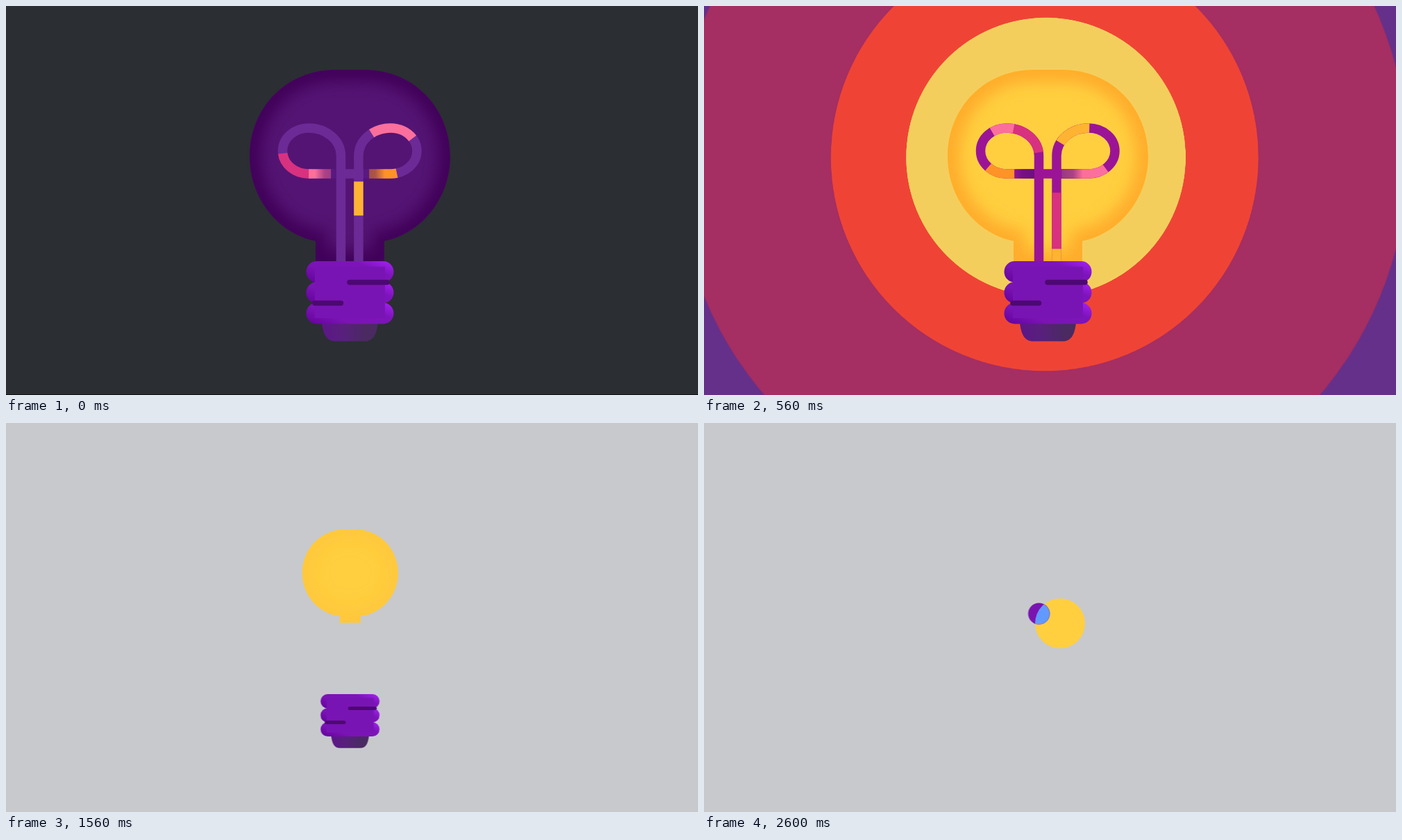
An HTML page without scripts that plays this animation: 997 by 561 pixels, repeating every 2640 ms.

```html
<!DOCTYPE html>
<html lang="en">
<head>
<meta charset="utf-8">
<title>Light bulb</title>
<style>
  html, body { margin: 0; width: 100%; height: 100%; overflow: hidden; background: #111; }
  svg { display: block; width: 100%; height: 100%; }
  svg * { animation: 2640ms linear infinite; }

  /* Expanding rings: one growth curve, 80 ms apart */
  .ring { animation-name: grow; animation-delay: calc(var(--lead) * -80ms); }
  .last { animation-name: grow, pale; animation-delay: 0s; }
  @keyframes grow {
    0%, 16.67% { transform: scale(0); }
    18.18% { transform: scale(1.25); }
    21.21% { transform: scale(2); }
    24.24% { transform: scale(3.05); }
    27.27% { transform: scale(5.22); }
    30.3%, 100% { transform: scale(8.5); }
  }
  @keyframes pale {
    0%, 19.7% { fill: #ffcf40; }
    27.27%, 100% { fill: #c8c9cd; }
  }

  /* Glass lights up, later shrinks to a ball */
  .glass { animation-name: shrink; }
  .fill { animation-name: shrink, light; }
  .edge { animation-name: shrink, light-edge; fill: none; stroke-width: 34; }
  .tube { animation-name: light-tube; }
  @keyframes shrink {
    0%, 46.97% {
      d: path("M446 370 L446 339 C392 328 351 277 351 217 C351 147 404 92 474 92 L517 92 C587 92 640 147 640 217 C640 277 599 328 545 339 L545 370 Z");
      animation-timing-function: ease-in;
    }
    62.12%, 100% {
      d: path("M496 252 L496 252 C476 252 460 236 460 216 C460 196 476 180 496 180 L496 180 C516 180 532 196 532 216 C532 236 516 252 496 252 L496 252 Z");
    }
  }
  @keyframes light {
    0%, 4.5% { fill: #541473; }
    10.6%, 100% { fill: #ffcf40; }
  }
  @keyframes light-edge {
    0%, 4.5% { stroke: #3f0058; }
    10.6%, 53% { stroke: #ffab2c; stroke-opacity: 1; }
    60.6%, 100% { stroke: #ffab2c; stroke-opacity: 0; }
  }
  @keyframes light-tube {
    0%, 4.5% { stroke: #6b2a95; }
    10.6%, 100% { stroke: #9b1496; }
  }

  /* Coloured pieces sliding along the filament */
  .run { animation-name: slide; }
  @keyframes slide {
    0% { stroke-dashoffset: calc(var(--a) * -1px); }
    15.15% { stroke-dashoffset: calc(var(--b) * -1px); }
    21.21% { stroke-dashoffset: calc(var(--c) * -1px); }
    28.79% { stroke-dashoffset: calc(var(--d) * -1px); }
    48.48% { stroke-dashoffset: calc(var(--e) * -1px); }
    58%, 100% { stroke-dashoffset: calc(40px - var(--e) * 1px); }
  }
  .filament { animation-name: fold; transform-origin: 496px 250px; }
  @keyframes fold {
    0%, 49.2% { transform: none; animation-timing-function: ease-in; }
    58%, 100% { transform: scale(0); }
  }

  .base { animation-name: drop; transform-origin: 496px 425px; }
  @keyframes drop {
    0%, 48.48% { transform: none; animation-timing-function: ease-in-out; }
    54.55% { transform: translateY(27px); animation-timing-function: ease-in; }
    62.12%, 100% { transform: translateY(-25px) scale(.25); }
  }

  .bulb { animation: hide 2640ms step-end infinite; }
  .balls { animation: show 2640ms step-end infinite; }
  @keyframes hide { 0% { opacity: 1; } 62.12%, 100% { opacity: 0; } }
  @keyframes show { 0% { opacity: 0; } 62.12%, 100% { opacity: 1; } }

  .sun { animation-name: sun; }
  .dot { animation-name: dot; }
  @keyframes sun {
    0%, 62.12% { transform: translate(496px, 216px); }
    63.64% { transform: translate(500px, 250px); animation-timing-function: ease-out; }
    71.21% { transform: translate(619px, 343px); animation-timing-function: ease-out; }
    80.3% { transform: translate(662px, 402px); animation-timing-function: ease-in-out; }
    84.85% { transform: translate(657px, 393px); animation-timing-function: ease-in; }
    98.48%, 100% { transform: translate(513px, 289px); }
  }
  @keyframes dot {
    0%, 62.12% { transform: translate(496px, 400px); }
    63.64% { transform: translate(485px, 340px); animation-timing-function: ease-out; }
    71.21% { transform: translate(327.5px, 216.5px); }
    72.73% { transform: translate(316px, 213px); animation-timing-function: ease-out; }
    84.85% { transform: translate(284px, 240px); animation-timing-function: ease-in; }
    98.48%, 100% { transform: translate(482.5px, 275px); }
  }
</style>
</head>
<body>
<svg viewBox="0 0 997 561" preserveAspectRatio="none">
  <defs>
    <clipPath id="glass-area"><path class="glass"/></clipPath>
    <clipPath id="sun-area"><circle class="sun" r="36"/></clipPath>
    <filter id="soft" x="-20%" y="-20%" width="140%" height="140%"><feGaussianBlur stdDeviation="11"/></filter>
    <linearGradient id="metal" x1="0" y1=".8" x2="1" y2=".2">
      <stop stop-color="#6805a0"/><stop offset=".3" stop-color="#7a14b4"/>
      <stop offset=".75" stop-color="#7d14ba"/><stop offset="1" stop-color="#9c1ee8"/>
    </linearGradient>
    <linearGradient id="foot">
      <stop stop-color="#5d1688"/><stop offset=".4" stop-color="#58207c"/><stop offset=".8" stop-color="#4a2a60"/>
    </linearGradient>
    <linearGradient id="shade">
      <stop stop-color="#4a0a6e" stop-opacity="0"/><stop offset=".45" stop-color="#4a0a6e" stop-opacity=".45"/>
      <stop offset="1" stop-color="#4a0a6e" stop-opacity=".55"/>
    </linearGradient>
    <path id="wire" d="M482.500 368V216A46.500 40 0 0 0 436 176A37.500 33 0 0 0 398.500 209A37.500 33 0 0 0 436 242H554A38 33 0 0 0 592 209A38 33 0 0 0 554 176A46 40 0 0 0 508 216V368"/>
    <rect id="thread" x="432.500" width="126" height="30.500" rx="15"/>
  </defs>

  <rect width="997" height="560" fill="#2b2e32"/>

  <g transform="translate(496 217.500)">
    <circle class="ring" style="--lead:3" cx="-1.700" cy=".3" r="100" fill="#65308a"/>
    <circle class="ring" style="--lead:2" cx="-1.700" cy=".3" r="100" fill="#a52e62"/>
    <circle class="ring" style="--lead:1" cx="-1.700" cy=".3" r="100" fill="#ef4435"/>
    <circle class="ring last" cx="-1.700" cy=".3" r="100"/>
  </g>

  <g class="bulb">
    <path class="glass fill"/>
    <g clip-path="url(#glass-area)">
      <path class="glass edge" filter="url(#soft)"/>
      <g class="filament" fill="none" stroke-width="13.500">
        <use href="#wire" class="tube"/>
        <use href="#wire" class="run" stroke="#d8317f" stroke-dasharray="56 2000" style="--a:279;--b:184;--c:157;--d:117;--e:24"/>
        <use href="#wire" class="run" stroke="#fb6f9c" stroke-dasharray="32 2000" style="--a:331;--b:246;--c:210;--d:172;--e:81"/>
        <use href="#wire" class="run" stroke="#ff9328" stroke-dasharray="40 2000" style="--a:418;--b:330;--c:302;--d:261;--e:176"/>
        <use href="#wire" class="run" stroke="#fb6f9c" stroke-dasharray="65 2000" style="--a:524;--b:440;--c:410;--d:373;--e:289"/>
        <use href="#wire" class="run" stroke="#ffb332" stroke-dasharray="49 2000" style="--a:665;--b:590;--c:559;--d:527;--e:452"/>
        <use href="#wire" class="run" stroke="#d8317f" stroke-dasharray="81 2000" style="--a:812;--b:725;--c:681;--d:648;--e:571"/>
        <use href="#wire" class="run" stroke="#ffb332" stroke-dasharray="32 2000" style="--a:893;--b:806;--c:762;--d:729;--e:651"/>
        <g fill="url(#shade)">
          <rect x="445" y="235" width="31" height="14"/>
          <rect x="445" y="235" width="31" height="14" transform="matrix(-1 0 0 1 991 0)"/>
        </g>
      </g>
    </g>
    <g class="base">
      <path d="M455 457C457 474 462 483.500 474 483.500H517C529 483.500 534 474 536 457Z" fill="url(#foot)"/>
      <g fill="url(#metal)">
        <use href="#thread" y="368"/>
        <use href="#thread" y="398"/>
        <use href="#thread" y="428"/>
        <rect x="445" y="376" width="101" height="74" fill="#7914b4"/>
      </g>
      <path d="M495 398.500H549M445 428.500H482.500" stroke="#4d0872" stroke-width="7.500" stroke-linecap="round"/>
    </g>
  </g>

  <g class="balls">
    <circle class="sun" r="36" fill="#ffcf40"/>
    <circle class="dot" r="15.500" fill="#7a14b0"/>
    <g clip-path="url(#sun-area)"><circle class="dot" r="15.500" fill="#6199ff"/></g>
  </g>
</svg>
</body>
</html>
```
